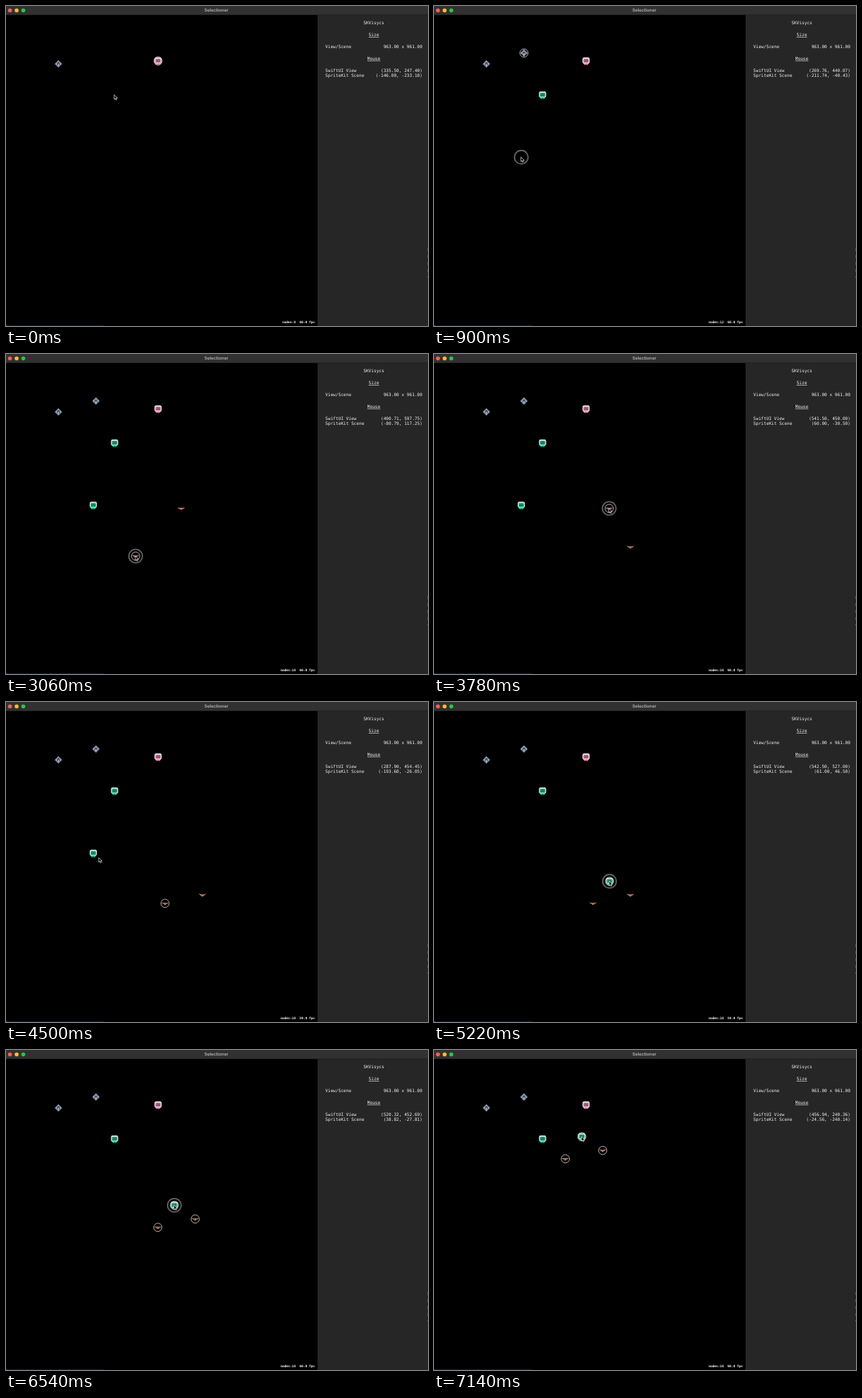
Recreate the animation shown at these times as an HTML page. Size 600 by 456 pixels, loop 7.2 s.

```html
<!DOCTYPE html>
<html lang="en">
<head>
<meta charset="utf-8">
<title>Selectioner</title>
<style>
html, body { margin: 0; width: 100%; height: 100%; overflow: hidden; background: #000; }
svg { display: block; width: 600px; height: 456px; }
text { white-space: pre; text-rendering: geometricPrecision; }
.mono { font: 6.13px "DejaVu Sans Mono", "Noto Sans Mono", monospace; fill: #f2f2f2; }
.title { font: 600 6.2px Inter, "Liberation Sans", sans-serif; fill: #b8b8b8; }
.stats { font: bold 4.5px "DejaVu Sans Mono", monospace; fill: #fff; }
.mid { text-anchor: middle; }
.end { text-anchor: end; }
.under { text-decoration: underline; text-decoration-thickness: .5px; }
</style>
</head>
<body>
<svg viewBox="0 0 600 456">
  <defs>
    <g id="robot">
      <path d="M-3.6 2h7.2v2l-1.3 1.7h-4.6l-1.3 -1.7z" fill="currentColor"/>
      <rect x="-5.1" y="-5" width="10.2" height="8.8" rx="2.4" fill="#e6e9ec"/>
      <rect x="-3.9" y="-3.3" width="7.8" height="6" rx="1.2" fill="currentColor"/>
      <rect x="-2.7" y="-2" width="5.4" height="3.5" rx=".6" fill="#26232c" opacity=".55"/>
      <path d="M-1.7 -.9h1.1v1.2h-1.1zM.6 -.9h1.1v1.2h-1.1z" fill="currentColor"/>
      <path d="M-1.3 4h2.6v1h-2.6z" fill="#000" opacity=".4"/>
    </g>
    <g id="turret">
      <path d="M0 -5.5L5.5 0L0 5.5L-5.5 0z" fill="#66738e"/>
      <path d="M0 -4L4 0L0 4L-4 0z" fill="#b3bccd"/>
      <path d="M-2 2v-2.4a2 2 0 0 1 4 0v2.4z" fill="#343c50"/>
      <path d="M-.7 2v-2.2h1.4v2.2z" fill="#cbd2df"/>
    </g>
    <g id="drone">
      <path class="wings" fill="#a58a7c"/>
      <path d="M-2.3 -.6h4.6l-1.1 2.9h-2.4z" fill="#9c4438"/>
      <circle class="core" cy=".8" r="1.2" fill="#f0704c"/>
    </g>
  </defs>

  <rect width="600" height="456"/>
  <rect width="600" height="13" fill="#313131"/>
  <rect y="12.3" width="600" height=".7" fill="#1c1c1c"/>
  <g id="lights"></g>
  <text class="title mid" x="299" y="8.4">Selectioner</text>

  <rect x="443" y="13" width="157" height="443" fill="#262626"/>
  <path d="M599.6 345v42" stroke="#606060" stroke-width=".8" stroke-dasharray="4 6"/>
  <path d="M0 454l4 1.3h136v.7h-140z" fill="#1d2740"/>
  <g class="mono" id="panel"></g>

  <g id="items"></g>
  <rect id="marquee" fill="none" stroke="#b9b932"/>
  <circle id="press" r="9.7" fill="none" stroke="#636363" stroke-width="1.8"/>
  <path id="cursor" d="M-.5 -.3V6.2L1 4.9L2 7.2L3.1 6.7L2.1 4.5H4.1z" fill="#000" stroke="#f4f4f4" stroke-width=".7" stroke-linejoin="round"/>
  <text class="stats end" x="439" y="452.1" id="stats"></text>
</svg>
<script>
const LOOP = 7200, STEP = 60, CLICK = 120;
const VIEW = { width: 963, height: 961 }, SCALE = 443 / VIEW.width, TOP = 13;
const PINK = "#e080a8", GREEN = "#1fb98a";
const $ = id => document.getElementById(id);

// All positions are in view units, times in ms
const items = [
  { kind: "turret", x: 162, y: 151, born: 0 },
  { kind: "robot", color: PINK, x: 470, y: 142, born: 0 }
];
const gestures = [
  { at: 60, x: 335.5, y: 247.4, place: "robot" },
  { at: 480, x: 278, y: 117.5, place: "turret" },
  { at: 840, x: 269.76, y: 440.07, place: "robot" },
  { at: 1440, x: 541.5, y: 450, place: "drone" },
  { at: 1860, x: 406.7, y: 541.44 },
  { at: 2040, x: 400.71, y: 597.75, place: "drone" },
  { at: 3060, drag: 6, x: 607, y: 569.5, time: 420 },
  { at: 3780, drag: 5, x: 491.5, y: 595.5, time: 300 },
  { at: 4500, x: 287.9, y: 454.45 },
  { at: 4620, drag: 4, x: 542.5, y: 527, time: 480 },
  { at: 5460, from: { x: 387.8, y: 466.2 }, x: 647.38, y: 621.05, time: 300 },
  { at: 6300, drag: 4, x: 456.94, y: 240.36, time: 540 }
];

const stops = [], presses = [], picks = [{ at: 0, items: [items[1]] }];
let marquee;

const last = (list, t) => list.filter(e => e.at <= t).pop();
const ease = u => u * u * (3 - 2 * u);
const minus = (a, b) => ({ x: a.x - b.x, y: a.y - b.y });
const during = (t, span) => t >= span.at && t < span.end;

function pointer(t) {
  const a = last(stops, t) || stops[0];
  const b = stops[stops.indexOf(a) + 1];
  if (!b || t <= a.leave) return a;
  const k = ease((t - a.leave) / (b.at - a.leave)), d = minus(b, a);
  return { x: a.x + d.x * k, y: a.y + d.y * k };
}

function position(item, t) {
  let { x, y } = item;
  for (const drag of item.drags || []) {
    if (t <= drag.at) continue;
    const d = minus(pointer(Math.min(t, drag.end)), pointer(drag.at));
    x += d.x;
    y += d.y;
  }
  return { x, y };
}

function place(g) {
  const item = { kind: g.place, color: GREEN, x: g.x, y: g.y, born: g.at + CLICK };
  stops.push({ ...g, leave: item.born });
  presses.push({ at: g.at, end: item.born });
  items.push(item);
  picks.push({ at: item.born, items: [item] });
}

function sweep(g, from) {
  const move = g.at + STEP, arrive = move + g.time, end = arrive + CLICK;
  stops.push({ at: g.at, leave: move, ...from }, { at: arrive, leave: end, x: g.x, y: g.y });
  const span = { at: g.at, end };
  presses.push(span);
  return span;
}

function dragItems(g) {
  const target = items[g.drag], span = sweep(g, position(target, g.at));
  let picked = last(picks, g.at).items;
  if (!picked.includes(target)) picks.push({ at: g.at, items: picked = [target] });
  for (const item of picked) (item.drags ||= []).push(span);
}

function selectArea(g) {
  marquee = { ...sweep(g, g.from), from: g.from };
  const inside = p => p.x > g.from.x && p.x < g.x && p.y > g.from.y && p.y < g.y;
  picks.push({ at: marquee.end, items: items.filter(i => inside(position(i, g.at))) });
}

for (const g of gestures) {
  if (g.place) place(g);
  else if ("drag" in g) dragItems(g);
  else if (g.from) selectArea(g);
  else stops.push({ ...g, leave: g.at });
}

const toStage = p => ({ x: p.x * SCALE, y: TOP + p.y * SCALE });
const show = (node, on) => node.setAttribute("visibility", on ? "visible" : "hidden");
const moveTo = (node, p) => node.setAttribute("transform", `translate(${p.x.toFixed(2)} ${p.y.toFixed(2)})`);
const pair = (x, y) => `(${x.toFixed(2)}, ${y.toFixed(2)})`;
const label = (y, text, cls = "", x = 454, id = "") => `<text class="${cls}" x="${x}" y="${y}" id="${id}">${text}</text>`;

$("panel").innerHTML =
  label(26.2, "SKVisycs", "mid", 523) +
  label(43, "Size", "mid under", 523) +
  label(60, "View/Scene") + label(60, "963.00 x 961.00", "end", 592) +
  label(76.8, "Mouse", "mid under", 523) +
  label(93.6, "SwiftUI View") + label(93.6, "", "end", 592, "viewPos") +
  label(101, "SpriteKit Scene") + label(101, "", "end", 592, "scenePos");

$("lights").innerHTML = ["#ff5f57", "#febc2e", "#28c840"]
  .map((fill, i) => `<circle cx="${5.6 + 9.5 * i}" cy="6.2" r="2.8" fill="${fill}"/>`).join("");

for (const item of items) {
  const node = document.createElementNS("http://www.w3.org/2000/svg", "g");
  node.style.color = item.color;
  node.innerHTML = $(item.kind).innerHTML +
    '<circle class="ring" r="5.9" fill="none" stroke="#dcdcdc" stroke-width=".8"/>';
  $("items").append(node);
  item.node = node;
  item.ring = node.querySelector(".ring");
  item.wings = node.querySelector(".wings");
}

function drawItem(item, t) {
  show(item.node, t >= item.born);
  item.ring.style.display = last(picks, t).items.includes(item) ? "" : "none";
  moveTo(item.node, toStage(position(item, t)));
  if (item.wings) {
    const tip = -1.2 + .5 * Math.sin((t + item.born) / 60);
    item.wings.setAttribute("d", `M-5.5 ${tip}L-2 -1H2L5.5 ${tip}L2.4 .9H-2.4z`);
  }
}

function draw(t) {
  const view = pointer(t), tip = toStage(view), selecting = during(t, marquee);
  $("viewPos").textContent = pair(view.x, view.y);
  $("scenePos").textContent = pair(view.x - VIEW.width / 2, view.y - VIEW.height / 2);
  moveTo($("cursor"), tip);
  moveTo($("press"), tip);
  show($("press"), presses.some(p => during(t, p)));
  items.forEach(item => drawItem(item, t));

  const corner = toStage(marquee.from), size = minus(tip, corner);
  const box = { ...corner, width: Math.max(0, size.x), height: Math.max(0, size.y) };
  for (const key in box) $("marquee").setAttribute(key, box[key].toFixed(2));
  show($("marquee"), selecting);

  const nodes = 4 + 2 * items.filter(i => t >= i.born).length + (selecting ? 4 : 0);
  const fps = t >= 4200 && t < 6300 ? "59.9" : "60.0";
  $("stats").textContent = `nodes:${nodes}  ${fps} fps`;
}

const start = performance.now();
function tick() {
  const t = (performance.now() - start) % LOOP;
  draw(Math.floor(t / STEP) * STEP);
  requestAnimationFrame(tick);
}
draw(0);
requestAnimationFrame(tick);
</script>
</body>
</html>
```
